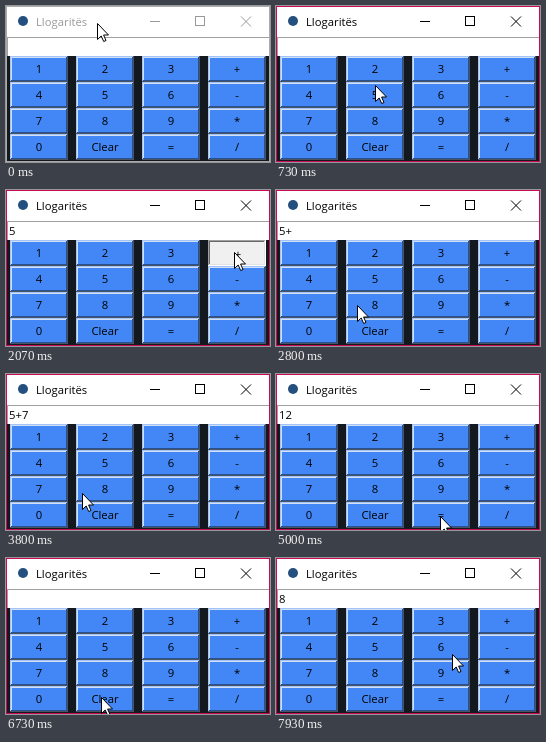
An HTML page that plays this animation: 264 by 156 pixels, repeating every 8000 ms.

```html
<!DOCTYPE html>
<html lang="sq">
<head>
<meta charset="utf-8">
<title>Llogaritës</title>
<style>
html, body { margin: 0; width: 100%; height: 100%; overflow: hidden; background: #fff; }
svg { display: block; width: 264px; height: 156px; }
text { font: 11.3px "Open Sans", "Noto Sans", sans-serif; }
rect, .crisp { shape-rendering: crispEdges; }
</style>
</head>
<body>
<svg id="stage" viewBox="0 0 264 156"></svg>
<script>
const TICKS = 120, RATE = 15;
const stage = document.getElementById('stage');

// Pointer moves: [first tick, last tick, x, y]
const home = [91, 17];
const moves = [
  [1, 2, 93, 16], [7, 11, 99, 79], [12, 13, 99, 91], [19, 27, 227, 63],
  [29, 29, 228, 62], [34, 41, 90, 115], [42, 45, 60, 115], [53, 53, 59, 115],
  [57, 64, 163, 142], [75, 77, 166, 142], [79, 80, 168, 140], [86, 90, 94, 140],
  [101, 101, 95, 139], [102, 106, 108, 95], [107, 107, 107, 106],
  [113, 116, 105, 105], [118, 119, 176, 96]
];

// [label, press tick, release tick, display after release]
const presses = [
  ['5', 16, 18, '5'], ['+', 31, 33, '5+'], ['7', 49, 51, '5+7'],
  ['=', 65, 68, '12'], ['Clear', 96, 97, ''], ['8', 110, 111, '8']
];
const labels = '1 2 3 + 4 5 6 - 7 8 9 * 0 Clear = /'.split(' ');

// Face, then light and shade edges from the outside in
const looks = {
  up: { face: '#4287f5', light: ['#a0c3fa', '#d3dff3'], shade: ['#4b5462', '#285193'] },
  down: { face: '#f0f0f0', light: ['#a0a0a0', '#696969'], shade: ['#ffffff', '#e3e3e3'] }
};

function add(name, attrs, parent = stage) {
  const el = document.createElementNS('http://www.w3.org/2000/svg', name);
  for (const k in attrs) el.setAttribute(k, attrs[k]);
  parent.appendChild(el);
  return el;
}
const box = (x, y, width, height, fill, parent) => add('rect', { x, y, width, height, fill }, parent);
function write(x, y, str, attrs, parent) {
  const el = add('text', { x, y, ...attrs }, parent);
  el.textContent = str;
  return el;
}

// Window frame
box(0, 0, 264, 156, '#fff');
add('circle', { cx: 17, cy: 15, r: 5, fill: '#24507f' });
const title = write(30, 20, 'Llogaritës');
const controls = add('path', {
  d: 'M144 15.5h10M189.5 10.5h9v9h-9z', fill: 'none', class: 'crisp'
});
const cross = add('path', { d: 'M235 10.5l10 10m0-10l-10 10', fill: 'none' });
box(1, 31, 262, 1, '#a0a0a0');
box(1, 31, 1, 19, '#a0a0a0');
box(1, 50, 262, 105, '#14181f');
const display = write(3, 45, '');

function makeKey(label, i) {
  const w = 58, h = 26;
  const g = add('g', { transform: `translate(${4 + i % 4 * 66} ${50 + (i >> 2) * h})` });
  // Nested rects: each ring shows one pixel of its colour
  const rings = [0, 1].map(n => ({
    shade: box(n, n, w - 2 * n, h - 2 * n, '', g),
    light: box(n, n, w - 2 * n - 1, h - 2 * n - 1, '', g)
  }));
  const face = box(2, 2, w - 4, h - 4, '', g);
  const text = write(w / 2, 17, label, { 'text-anchor': 'middle' }, g);
  return down => {
    const look = looks[down ? 'down' : 'up'];
    rings.forEach((r, n) => {
      r.light.setAttribute('fill', look.light[n]);
      r.shade.setAttribute('fill', look.shade[n]);
    });
    face.setAttribute('fill', look.face);
    text.setAttribute('transform', down ? 'translate(1 1)' : '');
  };
}
const keys = labels.map(makeKey);
const frame = add('rect', { x: 0.5, y: 0.5, width: 263, height: 155, fill: 'none' });
const pointer = add('path', {
  d: 'M.5 .5v16l3.7-3.5 2.5 5.5 2.3-1-2.4-5.5h4.9z', fill: '#fff', stroke: '#000'
});

const mix = (a, b, p) => a + (b - a) * p;
const blend = (a, b, p) => `rgb(${a.map((v, i) => Math.round(mix(v, b[i], p)))})`;

function pointAt(tick) {
  let at = home;
  for (const [first, end, x, y] of moves) {
    if (tick < first) break;
    const p = Math.min(1, (tick - first + 1) / (end - first + 1));
    const eased = 1 - (1 - p) ** 1.3;
    at = [mix(at[0], x, eased), mix(at[1], y, eased)];
  }
  return at.map(Math.round);
}

let last = -1;
function draw(tick) {
  const focus = [0, 0.45, 0.8][tick] ?? 1;
  const ink = blend([153, 153, 153], [0, 0, 0], focus);
  title.setAttribute('fill', ink);
  controls.setAttribute('stroke', ink);
  cross.setAttribute('stroke', ink);
  frame.setAttribute('stroke', blend([170, 170, 170], [199, 12, 86], focus));

  let shown = '', held = '';
  for (const [label, from, to, result] of presses) {
    if (tick >= from && tick < to) held = label;
    if (tick >= to) shown = result;
  }
  display.textContent = shown;
  keys.forEach((set, i) => set(labels[i] === held));
  pointer.setAttribute('transform', `translate(${pointAt(tick)})`);
}

const start = performance.now();
function loop(now) {
  const tick = Math.floor((Math.max(0, now - start) + 4) * RATE / 1000) % TICKS;
  if (tick !== last) draw(last = tick);
  requestAnimationFrame(loop);
}
loop(start);
</script>
</body>
</html>
```
